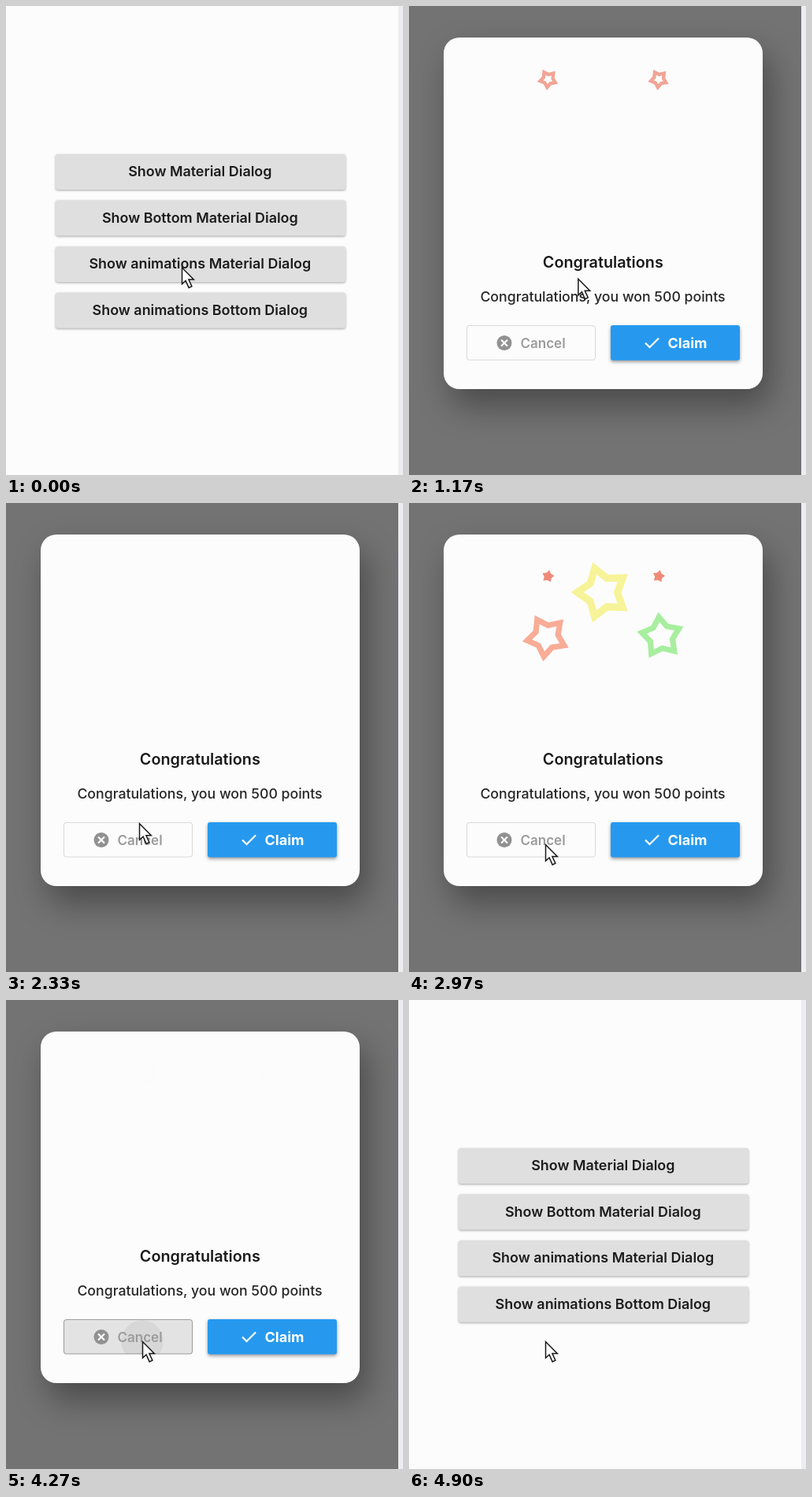
An HTML page with a canvas that plays this animation: 504 px wide and 595 px high, repeating every 4.93 s.

```html
<!DOCTYPE html>
<html lang="en">
<head>
<meta charset="utf-8">
<title>Dialog demo</title>
<style>
  html, body { margin: 0; width: 100%; height: 100%; overflow: hidden; background: #fcfcfd; }
  canvas { display: block; width: 504px; height: 595px; }
</style>
</head>
<body>
<canvas id="stage" width="504" height="595"></canvas>
<script>
const W = 504, H = 595, LOOP = 4930, PAGE_W = 498;
const PAPER = '#fcfcfd', FONT = 'Inter, "Open Sans", sans-serif';
const screen = document.getElementById('stage').getContext('2d');
const layer = document.createElement('canvas');
layer.width = W;
layer.height = H;
const overlay = layer.getContext('2d');

const clamp = x => Math.max(0, Math.min(1, x));
const span = (t, a, b) => clamp((t - a) / (b - a));
const smooth = x => x * x * (3 - 2 * x);
const easeOut = x => 1 - (1 - x) * (1 - x);
const ink = a => `rgba(0,0,0,${a})`;

// Interpolates along [time, value] pairs.
function track(t, keys, ease = x => x) {
  if (t <= keys[0][0]) return keys[0][1];
  for (let i = 1; i < keys.length; i++) {
    const [t0, v0] = keys[i - 1], [t1, v1] = keys[i];
    if (t <= t1) return v0 + (v1 - v0) * ease((t - t0) / (t1 - t0));
  }
  return keys[keys.length - 1][1];
}

function box(c, x, y, w, h, r) {
  c.beginPath();
  c.roundRect(x, y, w, h, r);
}

function shadow(c, color, blur, dx, dy) {
  c.shadowColor = color;
  c.shadowBlur = blur;
  c.shadowOffsetX = dx;
  c.shadowOffsetY = dy;
}

function label(c, text, x, y, size, weight, color, align = 'center') {
  c.font = `${weight} ${size}px ${FONT}`;
  c.textAlign = align;
  c.fillStyle = color;
  c.fillText(text, x, y);
}

// Ink splash clipped to the rounded box around it.
function splash(c, rect, x, y, radius, color) {
  c.save();
  box(c, ...rect);
  c.clip();
  c.fillStyle = color;
  c.beginPath();
  c.arc(x, y, radius, 0, Math.PI * 2);
  c.fill();
  c.restore();
}

const MENU = [
  'Show Material Dialog',
  'Show Bottom Material Dialog',
  'Show animations Material Dialog',
  'Show animations Bottom Dialog'
];

function drawPage(c, t) {
  c.fillStyle = PAPER;
  c.fillRect(0, 0, W, H);
  c.fillStyle = '#ededf1';
  c.fillRect(PAGE_W, 0, W - PAGE_W, H);
  MENU.forEach((text, i) => {
    const y = 188 + i * 58.6;
    const rect = [63, y, 368, 45, 3];
    c.save();
    shadow(c, ink(0.35), 3, 0, 1);
    c.fillStyle = '#dfdfe0';
    box(c, ...rect);
    c.fill();
    c.restore();
    if (i === 2 && t >= 30 && t < 900) {
      const held = Math.min(t, 200);
      const fade = 1 - span(t, 560, 800);
      c.fillStyle = ink(0.08 * span(held, 20, 150) * fade);
      box(c, ...rect);
      c.fill();
      splash(c, rect, 223, 332, track(held, [[20, 12], [200, 110]]), ink(0.08 * fade));
    }
    label(c, text, 246.3, y + 28, 17.9, 600, '#1c1c1c');
  });
}

function starPath(c, x, y, r, deg) {
  for (let i = 0; i < 10; i++) {
    const a = deg * Math.PI / 180 + i * Math.PI / 5;
    const d = i % 2 ? r * 0.6 : r;
    c[i ? 'lineTo' : 'moveTo'](x + d * Math.cos(a), y + d * Math.sin(a));
  }
  c.closePath();
}

function star(c, x, y, r, hole, deg, color, alpha) {
  if (r <= 0 || alpha <= 0) return;
  c.save();
  c.globalAlpha = alpha;
  c.fillStyle = color;
  c.beginPath();
  starPath(c, x, y, r, deg);
  if (hole > 0) starPath(c, x, y, r * hole, deg);
  c.fill('evenodd');
  c.restore();
}

function sparkle(c, x, y, p, color) {
  const near = track(p, [[70, 1], [130, 11], [230, 14.5], [330, 22]]);
  const length = track(p, [[70, 0], [130, 3.5], [230, 4], [330, 0]]);
  const width = track(p, [[70, 0], [130, 8], [230, 7.5], [330, 0]]);
  if (width <= 0) return;
  c.lineWidth = width;
  c.lineCap = 'round';
  c.strokeStyle = color;
  c.beginPath();
  for (const [dx, dy] of [[1, 0], [0, 1], [-1, 0], [0, -1]]) {
    c.moveTo(x + dx * near, y + dy * near);
    c.lineTo(x + dx * (near + length), y + dy * (near + length));
  }
  c.stroke();
}

// x, y, size, start angle, spin direction, fill colour, ring colour
const STARS = [
  [245.5, 113.5, 1, 0, 1, '#fedd52', '#f5ee62'],
  [174.5, 170, 0.78, -10, -1, '#ee7c43', '#f8805f'],
  [320, 169.5, 0.78, 12, -1, '#8cd5a5', '#7be66c']
];

function drawStars(c, t) {
  if (t < 600) return;
  const p = (t - 600) % 1000;
  const u = (p - 130) / 100;
  const turn = 6.4 * u + 3.6 * u * u;
  const grow = track(p, [[10, 0], [30, 3.2], [130, 33], [230, 36.5], [370, 40], [510, 42]]);
  const hole = track(p, [[215, 0], [230, 0.06], [370, 0.59], [510, 1]]);
  const alpha = track(p, [[270, 1], [370, 0.65], [510, 0]]);
  const tint = span(p, 230, 370);
  for (const [x, y, size, deg, dir, fill, ring] of STARS) {
    const angle = deg + dir * turn;
    star(c, x, y, grow * size, hole, angle, fill, alpha * (1 - tint));
    star(c, x, y, grow * size, hole, angle, ring, alpha * tint);
  }
  sparkle(c, 161.5, 223, p, '#86d39b');
  sparkle(c, 333, 223, p, '#fedc55');

  const r = track(p, [[330, 0], [370, 8], [450, 13], [680, 15]]);
  const gap = track(p, [[480, 0], [680, 1]]);
  const fade = 0.85 * (1 - span(p, 540, 680));
  for (const x of [176.5, 317]) star(c, x, 93, r, gap, 210 + (p - 370) * 0.15, '#eb7760', fade);
}

function drawCancel(c, t) {
  const rect = [73.5, 405.5, 163, 43.5, 3];
  const press = span(t, 4130, 4330);
  if (press) {
    c.fillStyle = ink(0.14 * press);
    box(c, ...rect);
    c.fill();
    const radius = track(t, [[4150, 8], [4630, 82], [4800, 125]]);
    splash(c, rect, 173, 433, radius, ink(0.08 * press));
  }
  c.lineWidth = 1;
  c.strokeStyle = ink(0.14 + 0.3 * press);
  box(c, ...rect);
  c.stroke();

  c.fillStyle = '#919191';
  c.beginPath();
  c.arc(121, 427.5, 9.5, 0, Math.PI * 2);
  c.fill();
  c.strokeStyle = PAPER;
  c.lineWidth = 2.2;
  c.lineCap = 'butt';
  c.beginPath();
  c.moveTo(117, 423.5);
  c.lineTo(125, 431.5);
  c.moveTo(125, 423.5);
  c.lineTo(117, 431.5);
  c.stroke();
  label(c, 'Cancel', 141.5, 434, 17, 600, '#9b9b9b', 'left');
}

function drawClaim(c) {
  c.save();
  shadow(c, ink(0.4), 4, 0, 2);
  c.fillStyle = '#2699ef';
  box(c, 256, 405, 164, 44.5, 3);
  c.fill();
  c.restore();
  c.strokeStyle = '#fff';
  c.lineWidth = 2.2;
  c.lineCap = 'butt';
  c.beginPath();
  c.moveTo(300, 427.5);
  c.lineTo(305.5, 433);
  c.lineTo(317, 421.5);
  c.stroke();
  label(c, 'Claim', 328.5, 434, 18, 700, '#fff', 'left');
}

function drawDialog(c, t) {
  c.clearRect(0, 0, W, H);
  c.save();
  c.beginPath();
  c.rect(0, 0, PAGE_W, H);
  c.clip();
  shadow(c, ink(0.36), 42, 9, 21);
  c.fillStyle = PAPER;
  box(c, 44, 40, 405, 446, 20);
  c.fill();
  c.restore();

  drawStars(c, t);
  label(c, 'Congratulations', 246.3, 332, 19.8, 600, '#1a1a1a');
  label(c, 'Congratulations, you won 500 points', 246, 375, 17.7, 500, '#262626');
  drawCancel(c, t);
  drawClaim(c);
}

function dialogAlpha(t) {
  if (t < 530) return 0;
  if (t < 4585) return easeOut(span(t, 505, 680));
  return 1 - span(t, 4585, 4785) ** 2;
}

const PATH_X = [[1100, 223], [1330, 185], [1620, 165], [2150, 165], [2480, 172], [2780, 173]];
const PATH_Y = [[1100, 332], [1330, 395], [1620, 337], [2150, 337], [2480, 459], [2780, 433.5]];
const ARROW = [[0, 0], [0, 20.5], [4.6, 16.4], [8.6, 25.4], [12.4, 23.6], [8.4, 15], [14.8, 15]];

function drawCursor(c, t) {
  const x = track(t, PATH_X, smooth) + 0.5;
  const y = track(t, PATH_Y, smooth);
  c.beginPath();
  ARROW.forEach(([dx, dy]) => c.lineTo(x + dx, y + dy));
  c.closePath();
  c.lineWidth = 1.5;
  c.lineJoin = 'miter';
  c.fillStyle = '#fff';
  c.strokeStyle = '#181818';
  c.fill();
  c.stroke();
}

function render(t) {
  drawPage(screen, t);
  const alpha = dialogAlpha(t);
  if (alpha > 0) {
    drawDialog(overlay, t);
    screen.fillStyle = ink(0.54 * alpha);
    screen.fillRect(0, 0, PAGE_W, H);
    screen.globalAlpha = alpha;
    screen.drawImage(layer, 0, 0);
    screen.globalAlpha = 1;
  }
  drawCursor(screen, t);
}

const start = performance.now();
function tick() {
  render((performance.now() - start) % LOOP);
  requestAnimationFrame(tick);
}
tick();
</script>
</body>
</html>
```
